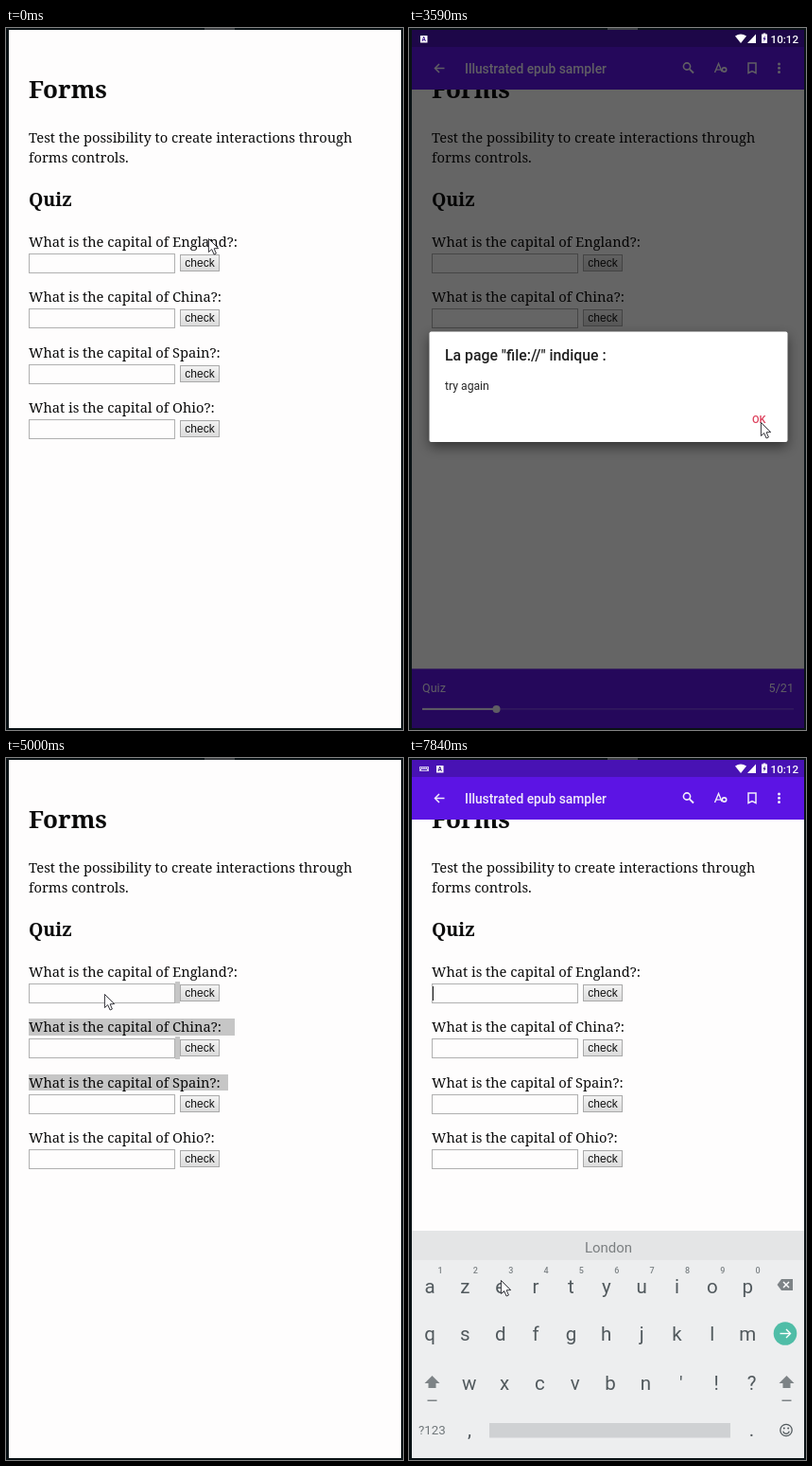
An HTML page with a canvas that plays this animation: 420x741 px, repeating every 8 s.

```html
<!DOCTYPE html>
<html lang="en">
<head>
<meta charset="utf-8">
<title>Forms quiz</title>
<style>
html, body { margin: 0; width: 100%; height: 100%; overflow: hidden; background: #0a1215; }
canvas { display: block; width: 420px; height: 741px; }
</style>
</head>
<body>
<canvas id="stage" width="420" height="741"></canvas>
<script>
const g = document.getElementById('stage').getContext('2d');
const LOOP = 8000;
const SERIF = '"Noto Serif", serif', SANS = 'Roboto, sans-serif', ARIAL = '"Liberation Sans", Arial, sans-serif';
const COUNTRIES = ['England', 'China', 'Spain', 'Ohio'];

// Keyframes: [time, ...values]
const CURSOR = [[90, 214, 222], [340, 200, 242], [420, 200, 242], [670, 195, 249], [1910, 195, 249],
  [2340, 325, 372], [2420, 325, 372], [2840, 372, 416], [3910, 372, 416], [4340, 142, 248],
  [4420, 142, 248], [4670, 104, 249], [6910, 104, 249], [7340, 102, 440], [7420, 102, 440], [7750, 97, 551]];
const DIM = [[1090, 0], [1170, .25], [1250, .54], [1500, .6], [3590, .6], [3670, .3], [3750, .05], [3840, 0]];
const DIALOG = [[1090, 0], [1170, .5], [1250, 1], [3590, 1], [3670, .35], [3750, 0]];
const TOP_BAR = [[1090, 0], [1170, .4], [1250, .8], [1500, 1], [3590, 1], [3670, .3], [3750, 0],
  [5000, 0], [5090, .35], [5170, .8], [5340, 1], [6340, 1], [6500, .78], [6590, .9], [6670, 1]];
const LOW_BAR = [[1090, 0], [1170, .4], [1250, .8], [1500, 1], [3590, 1], [3670, .3], [3750, 0],
  [5000, 0], [5090, .35], [5170, .8], [5340, 1], [6340, 1], [6500, .28], [6590, 0]];
const LOW_SHIFT = [[1170, 4], [1250, 1.7], [1500, 0], [5000, 4], [5340, 0], [6340, 0], [6500, 1.7]];
const KEYS_SHIFT = [[6500, 28], [6590, 8], [6670, 0]];
const KEYS_ALPHA = [[6499, 0], [6500, .75], [6590, 1]];

function at(keys, t) {
  if (t <= keys[0][0]) return keys[0].slice(1);
  for (let i = 1; i < keys.length; i++) {
    const a = keys[i - 1], b = keys[i];
    if (t <= b[0]) {
      const k = (t - a[0]) / (b[0] - a[0]);
      return a.slice(1).map((v, j) => v + (b[j + 1] - v) * k);
    }
  }
  return keys[keys.length - 1].slice(1);
}

// The screen refreshes five times, then rests until the next half second
function tick(t) {
  const part = t % 500;
  return t - part + [340, 250, 170, 90, 0].find(v => part >= v);
}

function rect(x, y, w, h, color) {
  g.fillStyle = color;
  g.fillRect(x, y, w, h);
}

function text(s, x, y, font, color, align = 'left') {
  g.font = font;
  g.fillStyle = color;
  g.textAlign = align;
  g.fillText(s, x, y);
}

function line(points, color, width = 1.5, close = false) {
  g.beginPath();
  points.forEach(([x, y]) => g.lineTo(x, y));
  if (close) g.closePath();
  g.strokeStyle = color;
  g.lineWidth = width;
  g.stroke();
}

function poly(points, color) {
  g.beginPath();
  points.forEach(([x, y]) => g.lineTo(x, y));
  g.closePath();
  g.fillStyle = color;
  g.fill();
}

function disc(x, y, r, color) {
  g.beginPath();
  g.arc(x, y, r, 0, 7);
  g.fillStyle = color;
  g.fill();
}

function ring(x, y, r, color, width = 1.5, from = 0, to = 2 * Math.PI) {
  g.beginPath();
  g.arc(x, y, r, from, to);
  g.strokeStyle = color;
  g.lineWidth = width;
  g.stroke();
}

function layer(alpha, draw, ...args) {
  if (alpha <= 0) return;
  g.save();
  g.globalAlpha = alpha;
  draw(...args);
  g.restore();
}

function button(y, hover) {
  const fill = g.createLinearGradient(0, y, 0, y + 18);
  fill.addColorStop(0, hover ? '#fafafa' : '#f4f4f4');
  fill.addColorStop(1, hover ? '#e4e4e4' : '#dadada');
  rect(184, y, 42, 18, fill);
  g.strokeStyle = hover ? '#8c8c8c' : '#a9a9a9';
  g.lineWidth = 1;
  g.strokeRect(184.5, y + .5, 41, 17);
  text('check', 205, y + 12.5, '12px ' + ARIAL, '#111', 'center');
}

function page(t, cx, cy) {
  const ink = '#0b0b0b', body = '14.7px ' + SERIF;
  rect(3, 2, 415, 737, '#fefdfd');
  if (t >= 5000 && t < 5090) {
    rect(24, 275, 218, 18, '#c6c6c6');
    rect(24, 334, 211, 17, '#c6c6c6');
    rect(179, 236, 5, 23, '#c6c6c6');
    rect(179, 294, 5, 24, '#c6c6c6');
  }
  text('Forms', 24, 74, 'bold 26px ' + SERIF, ink);
  text('Test the possibility to create interactions through', 24, 121, body, ink);
  text('forms controls.', 24, 142, body, ink);
  text('Quiz', 24, 188, 'bold 19.5px ' + SERIF, ink);
  COUNTRIES.forEach((name, i) => {
    const y = Math.round(238 + i * 58.4);
    text(`What is the capital of ${name}?:`, 24, y - 7, body, ink);
    g.strokeStyle = '#b0b0b0';
    g.lineWidth = 1;
    g.strokeRect(24.5, y + .5, 154, 20);
    const hover = cx >= 184 && cx <= 226 && cy >= y + 1 && cy <= y + 19;
    button(y + 1, hover);
  });
  if (t >= 5340) rect(25, 241, 1, 15, '#222');
}

function appBar() {
  const c = '#f0ebfa';
  rect(3, 2, 415, 18, '#4812b4');
  rect(3, 20, 415, 45, '#5c14e4');
  line([[37.5, 42.5], [28, 42.5]], c);
  line([[32, 38], [27.5, 42.5], [32, 47]], c);
  text('Illustrated epub sampler', 59, 47.5, '500 13.8px ' + SANS, c);
  ring(294, 40.5, 3.6, c, 1.6);
  line([[296.8, 43.3], [301, 47.5]], c, 1.9);
  line([[323.5, 47], [327.5, 37.5], [331, 46]], c, 1.4);
  line([[325, 44], [330, 44]], c, 1.2);
  ring(333.5, 44, 2.2, c, 1.7);
  line([[359, 37], [367, 37], [367, 47.5], [363, 45.5], [359, 47.5]], c, 1.5, true);
  [38, 42.3, 46.6].forEach(y => disc(391.5, y, 1.5, c));
}

function statusIcons(keyboard) {
  const c = '#fff';
  const x = keyboard ? 29 : 12;
  if (keyboard) {
    rect(11, 9, 10, 5, '#cfc4ee');
    for (let i = 0; i < 4; i++) rect(12 + i * 2.3, 10, 1, 1, '#4812b4');
    rect(13, 12, 6, 1, '#4812b4');
  }
  rect(x, 8, 7.5, 7.5, c);
  text('A', x + 3.75, 14.2, 'bold 6.5px ' + SANS, '#38108c', 'center');
  g.beginPath();
  g.moveTo(351, 16);
  g.lineTo(345, 8.5);
  g.quadraticCurveTo(351, 4.5, 357, 8.5);
  g.closePath();
  g.fillStyle = c;
  g.fill();
  poly([[358, 16], [367, 16], [367, 6.5]], c);
  rect(373, 6.5, 6, 9.5, c);
  rect(374.7, 5.5, 2.6, 1.5, c);
  poly([[376.8, 8], [374.4, 11.8], [375.8, 11.8], [375.3, 14.6], [377.7, 10.7], [376.3, 10.7]], '#38108c');
  text('10:12', 412, 15.5, '500 11.6px ' + SANS, c, 'right');
}

function lowBar(y) {
  rect(3, y, 415, 739 - y, '#5c14e4');
}

function lowText(y) {
  const c = '#efe9fb', font = '12.6px ' + SANS;
  text('Quiz', 14, y + 25, font, c);
  text('5/21', 407, y + 25, font, c, 'right');
  rect(14, y + 42, 393, 1, 'rgba(255,255,255,.3)');
  rect(14, y + 41.5, 79, 2, c);
  disc(92.5, y + 42.5, 4, c);
}

function shiftKey(x, c) {
  poly([[x, 652], [x + 8, 660], [x + 4, 660], [x + 4, 665], [x - 4, 665], [x - 4, 660], [x - 8, 660]], c);
  rect(x - 5, 677.5, 10, 1.5, c);
}

function keyboard(dy, hint) {
  const ink = '#51595d', soft = '#7d8386', big = '20.5px ' + SANS;
  const col = i => 22 + i * 37.35;
  g.translate(0, dy);
  rect(3, 499, 415, 31, '#e4e5e6');
  rect(3, 530, 415, 212, '#edeeef');
  if (hint) text('London', 211, 521.5, '15px ' + SANS, '#7b7f81', 'center');
  else [149, 271].forEach(x => rect(x, 507, 1, 17, '#cfd1d3'));
  [...'azertyuiop'].forEach((k, i) => {
    text(k, col(i), 564.5, big, ink, 'center');
    text((i + 1) % 10, col(i) + 11, 544, '500 9px ' + SANS, soft, 'center');
  });
  [...'qsdfghjklm'].forEach((k, i) => text(k, col(i), 615, big, ink, 'center'));
  [..."wxcvbn'!?"].forEach((k, i) => text(k, col(i) + 41.7, 666.5, big, ink, 'center'));
  poly([[389.5, 556], [394, 550], [406, 550], [406, 562], [394, 562]], soft);
  line([[396, 553], [402, 559]], '#fff', 1.4);
  line([[402, 553], [396, 559]], '#fff', 1.4);
  disc(398, 607.5, 12.3, '#50bda7');
  line([[392.5, 607.5], [403, 607.5]], '#fff', 1.4);
  line([[399, 603], [403.5, 607.5], [399, 612]], '#fff', 1.4);
  shiftKey(24.5, soft);
  shiftKey(399.5, soft);
  text('?123', 10, 714, '13.3px ' + SANS, '#70777a');
  text(',', 64, 716, big, ink, 'center');
  text('.', 362.5, 716, big, ink, 'center');
  rect(85, 702, 255, 15.5, '#cfd1d3');
  ring(399, 709.5, 6.2, ink, 1.3);
  disc(396.8, 707.6, 1, ink);
  disc(401.2, 707.6, 1, ink);
  ring(399, 710, 3.3, ink, 1.3, .2, Math.PI - .2);
}

function dialog() {
  g.save();
  g.shadowColor = 'rgba(0,0,0,.5)';
  g.shadowBlur = 13;
  g.shadowOffsetY = 5;
  g.beginPath();
  g.roundRect(21.5, 320.5, 379, 116.5, 2);
  g.fillStyle = '#fff';
  g.fill();
  g.restore();
  text('La page "file://" indique :', 38, 351, '500 15.8px ' + SANS, '#202020');
  text('try again', 38, 381.5, '12.2px ' + SANS, '#262626');
  text('OK', 363, 417, '500 11px ' + SANS, '#dd3f5b');
}

function pointer(x, y) {
  const shape = [[0, 0], [0, 14.2], [3.3, 11.2], [5.7, 16.6], [8, 15.6], [5.7, 10.4], [10.3, 10.2]]
    .map(([a, b]) => [x + a + .4, y + b + .4]);
  poly(shape, '#fff');
  line(shape, '#34343a', 1, true);
}

function draw(time) {
  const t = tick(time);
  const [cx, cy] = at(CURSOR, t);
  const [dim] = at(DIM, t), [top] = at(TOP_BAR, t), [low] = at(LOW_BAR, t);
  const [keys] = at(KEYS_ALPHA, t);
  const lowY = 674 + at(LOW_SHIFT, t)[0];
  rect(0, 0, 420, 741, '#0a1215');
  rect(210, 0, 32, 2, '#3d4144');
  g.save();
  g.beginPath();
  g.rect(3, 2, 415, 737);
  g.clip();
  page(t, cx, cy);
  layer(keys, keyboard, at(KEYS_SHIFT, t)[0], t >= 6840);
  layer(top, appBar);
  layer(low, lowBar, lowY);
  layer(Math.min(1, low * 3), lowText, lowY);
  layer(dim, rect, 3, 2, 415, 737, '#000');
  layer(top, statusIcons, t >= 6500);
  layer(at(DIALOG, t)[0], dialog);
  pointer(cx, cy);
  g.restore();
}

const start = performance.now();
function frame() {
  draw((performance.now() - start) % LOOP);
  requestAnimationFrame(frame);
}
frame();
</script>
</body>
</html>
```
